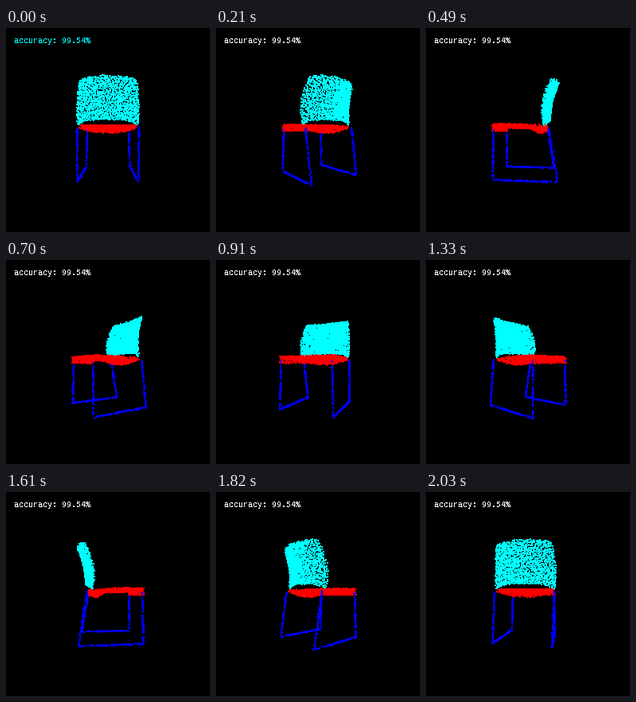
These frames come from a looping animation (256x256 px, 2100 ms). A matplotlib script:

```python
import numpy as np
import matplotlib.pyplot as plt
from matplotlib.animation import FuncAnimation

SIZE, FRAMES, LOOP = 256, 30, 2100
EYE = 202  # camera distance from the turning axis
DOT = 2
CYAN, RED, BLUE = (0, 255, 255), (255, 0, 0), (0, 0, 255)

rng = np.random.default_rng(4)


def sheet(cols, rows):
    """One random point per grid cell; both coordinates run from 0 to 1."""
    j, i = np.divmod(np.arange(cols * rows), cols)
    du, dv = rng.uniform(0, 1, (2, cols * rows))
    return (i + du) / cols, (j + dv) / rows


def backrest():
    u, t = sheet(43, 33)
    u = 2 * u - 1
    half = 34.5 - 3 * t + 9 * t * (1 - t)
    low = -4.5 - 6.5 * (1 - u**4)
    high = -56 + 3 * u**8
    edge = 20 - 12 * t + 20 * t**2
    bow = (7 + 10 * t * (1 - t) + 2 * t) * (1 - u**2)
    depth = edge + bow + rng.uniform(-1, 1, u.size)
    return np.column_stack([u * half, low + (high - low) * t, depth])


def seat():
    u, v = sheet(38, 32)
    u, v = 64 * u - 32, 60 * v - 36
    dish = 6 * (1 - (u / 32) ** 2) * np.exp(-(((v - 16) / 9) ** 2))
    y = -4.3 + 0.02 * v + dish + rng.uniform(-2.3, 2.3, u.size)
    return np.column_stack([u, y, v])


def seat_lip():
    u, t = sheet(40, 6)
    return np.column_stack([64 * u - 32, 8 * t - 6.5,
                            rng.uniform(-36, -33, u.size)])


def tube(a, b, n):
    a, b = np.array(a), np.array(b)
    t = rng.uniform(0, 1, (n, 1))
    return a + (b - a) * t + rng.uniform(-0.7, 0.7, (n, 3))


def sled(side):
    path = [(30.5 * side, -2, -34.5), (32 * side, 54, -35),
            (32 * side, 54, 34), (34 * side, -3, 25)]
    return np.vstack([tube(a, b, n)
                      for a, b, n in zip(path, path[1:], (80, 100, 85))])


parts = [(backrest(), CYAN), (seat(), RED), (seat_lip(), RED),
         (sled(-1), BLUE), (sled(1), BLUE)]
points = np.vstack([p for p, _ in parts])
colors = np.vstack([np.tile(c, (len(p), 1)) for p, c in parts]).astype(np.uint8)


def render(angle):
    u, y, v = points.T
    x = u * np.cos(angle) + v * np.sin(angle)
    z = v * np.cos(angle) - u * np.sin(angle)
    scale = EYE / (EYE - z)
    col = np.rint((SIZE - DOT) / 2 + x * scale).astype(int)
    row = np.rint((SIZE - DOT) / 2 + y * scale).astype(int)
    img = np.zeros((SIZE, SIZE, 3), np.uint8)
    for i in np.argsort(z):
        img[row[i]:row[i] + DOT, col[i]:col[i] + DOT] = colors[i]
    return img


fig = plt.figure(figsize=(SIZE / 100, SIZE / 100), dpi=100, facecolor="black")
ax = fig.add_axes([0, 0, 1, 1])
ax.axis("off")
picture = ax.imshow(render(0), extent=(0, SIZE, SIZE, 0),
                    interpolation="nearest", aspect="auto")
# Struck twice, one pixel apart, for heavy bitmap-like stems
labels = [ax.text(x, 19, "accuracy: 99.54%", family="Liberation Mono",
                  size=7.2, va="baseline", antialiased=False)
          for x in (9.5, 10.5)]


def draw(i):
    picture.set_data(render(2 * np.pi * i / FRAMES))
    for label in labels:
        label.set_color("cyan" if i == 0 else "white")
    return picture, *labels


anim = FuncAnimation(fig, draw, frames=FRAMES, interval=LOOP / FRAMES,
                     repeat=True, repeat_delay=0)
plt.show()
```
